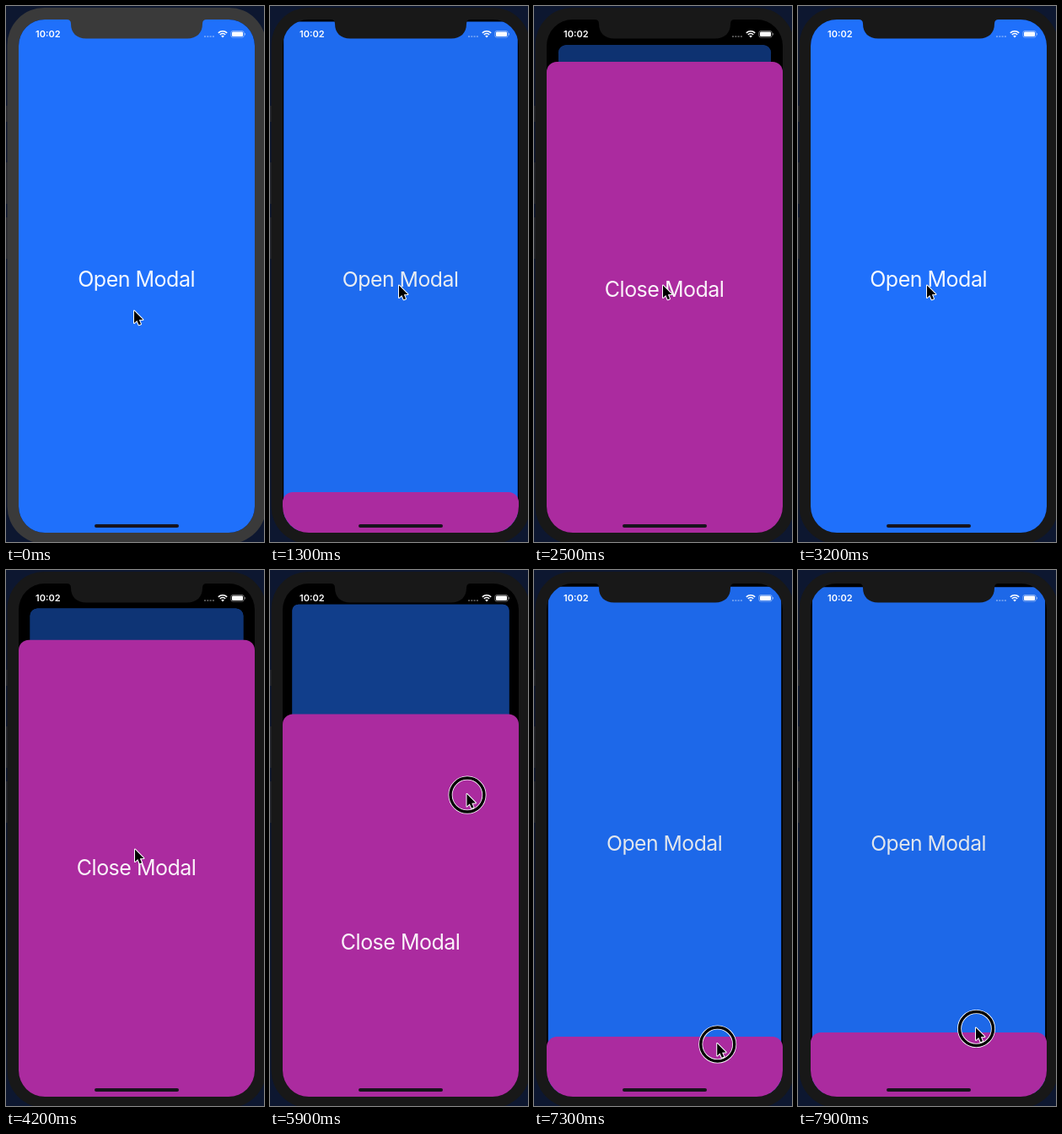
Write an HTML page with a canvas that moves like this. It is 306 by 634 pixels and loops after 8 s.

```html
<!DOCTYPE html>
<html lang="en">
<head>
<meta charset="utf-8">
<title>Modal sheet</title>
<style>
  html, body { margin: 0; width: 100%; height: 100%; overflow: hidden; background: #0d1730; }
  canvas { display: block; width: 306px; height: 634px; }
</style>
</head>
<body>
<canvas id="stage"></canvas>
<script>
const W = 306, H = 634, LOOP = 8000, STEP = 100;
const BLUE = '#1f70fb', PURPLE = '#ab2b9f';
const SCREEN = { x: 15, y: 16, w: 280, h: 607, r: 31 };
const OPEN_Y = 66, CLOSED_Y = 623;

const canvas = document.getElementById('stage');
const ctx = canvas.getContext('2d');
const dpr = window.devicePixelRatio || 1;
canvas.width = W * dpr;
canvas.height = H * dpr;

const lerp = (a, b, k) => a + (b - a) * k;
const clamp = v => Math.max(0, Math.min(1, v));
const smooth = k => k * k * (3 - 2 * k);

// Keys are [time, ...values]
function track(keys, t) {
  if (t <= keys[0][0]) return keys[0].slice(1);
  for (let i = 1; i < keys.length; i++) {
    const a = keys[i - 1], b = keys[i];
    if (t < b[0]) {
      const k = smooth((t - a[0]) / (b[0] - a[0]));
      return a.slice(1).map((v, j) => lerp(v, b[j + 1], k));
    }
  }
  return keys[keys.length - 1].slice(1);
}

const pointerKeys = [
  [0, 152, 360], [200, 197, 350], [450, 131, 324], [600, 153, 330],
  [4750, 153, 330], [5500, 232, 160], [5650, 232, 160],
  [6250, 236, 438], [6800, 238, 326], [7450, 214, 596], [7900, 211, 541]
];
const dragKeys = [
  [5650, OPEN_Y], [6250, 344], [6800, 233], [7450, 602], [7900, 547]
];

// Critically damped spring: the part still to travel, ms in
function rest(ms, omega) {
  const x = omega * Math.max(0, ms) / 1000;
  return (1 + x) * Math.exp(-x);
}

function sheetY(t) {
  if (t < 1270) return CLOSED_Y;
  if (t < 2840) return lerp(OPEN_Y, CLOSED_Y, rest(t - 1270, 16.2));
  if (t < 3200) return lerp(CLOSED_Y, OPEN_Y, rest(t - 2840, 20));
  if (t < 3870) return CLOSED_Y;
  if (t < 5650) return lerp(OPEN_Y, CLOSED_Y, rest(t - 3870, 16.2));
  return track(dragKeys, t)[0];
}

const within = (t, from) => t >= from && t < from + 100;
const isTap = t => [900, 2700, 3600].some(from => within(t, from));

function box(x, y, w, h, r, fill) {
  ctx.beginPath();
  ctx.roundRect(x, y, w, h, r);
  ctx.fillStyle = fill;
  ctx.fill();
}

function label(text, y, alpha) {
  ctx.font = '400 25px Inter, "Liberation Sans", sans-serif';
  ctx.letterSpacing = '-0.5px';
  ctx.textAlign = 'center';
  ctx.fillStyle = `rgba(255,255,255,${alpha})`;
  ctx.fillText(text, 154.6, y);
  ctx.letterSpacing = '0px';
}

function drawPage(p, alpha) {
  const { x, y, w, h } = SCREEN;
  const cx = x + w / 2, cy = y + h / 2, s = 1 - 0.1 * p;
  ctx.save();
  ctx.translate(cx, cy);
  ctx.scale(s, s);
  ctx.translate(-cx, -cy);
  box(x, y, w, h, 10 * p, BLUE);
  label('Open Modal', 332, alpha);
  box(x, y, w, h, 10 * p, `rgba(0,0,0,${0.55 * p})`);
  ctx.restore();
}

function drawSheet(y, alpha) {
  if (y >= CLOSED_Y) return;
  box(SCREEN.x, y, SCREEN.w, H, 12, PURPLE);
  label('Close Modal', y + 278, alpha);
}

function drawNotch(color) {
  ctx.beginPath();
  ctx.moveTo(72, 15);
  ctx.lineTo(72, 16);
  ctx.quadraticCurveTo(77, 16, 77, 21);
  ctx.bezierCurveTo(77, 32, 84, 38.5, 95, 38.5);
  ctx.lineTo(215, 38.5);
  ctx.bezierCurveTo(226, 38.5, 233, 32, 233, 21);
  ctx.quadraticCurveTo(233, 16, 238, 16);
  ctx.lineTo(238, 15);
  ctx.closePath();
  ctx.fillStyle = color;
  ctx.fill();
}

function drawStatus() {
  ctx.fillStyle = '#fff';
  ctx.textAlign = 'left';
  ctx.font = '600 11px Inter, "Liberation Sans", sans-serif';
  ctx.fillText('10:02', 35, 37.2);

  ctx.fillStyle = 'rgba(255,255,255,.4)';
  for (let i = 0; i < 4; i++) ctx.fillRect(235 + i * 3.3, 35.3, 2, 1.6);

  ctx.strokeStyle = '#fff';
  ctx.lineWidth = 1.6;
  for (const r of [4.5, 7.3]) {
    ctx.beginPath();
    ctx.arc(257, 37, r, -Math.PI * 0.75, -Math.PI * 0.25);
    ctx.stroke();
  }
  ctx.beginPath();
  ctx.moveTo(257, 37.4);
  ctx.arc(257, 37.4, 2.6, -Math.PI * 0.75, -Math.PI * 0.25);
  ctx.fillStyle = '#fff';
  ctx.fill();

  ctx.beginPath();
  ctx.roundRect(266.8, 29.5, 15.4, 7.6, 2.2);
  ctx.strokeStyle = 'rgba(255,255,255,.5)';
  ctx.lineWidth = 0.8;
  ctx.stroke();
  box(268, 30.6, 13, 5.4, 1.2, '#fff');
  box(283, 32, 1, 2.6, 0.5, 'rgba(255,255,255,.5)');
}

function drawPointer(x, y, pressed) {
  if (pressed) {
    ctx.beginPath();
    ctx.arc(x + 0.5, y + 1.5, 20, 0, Math.PI * 2);
    ctx.strokeStyle = '#fff';
    ctx.lineWidth = 5;
    ctx.stroke();
    ctx.strokeStyle = '#000';
    ctx.lineWidth = 3.4;
    ctx.stroke();
  }
  ctx.save();
  ctx.translate(x, y);
  ctx.beginPath();
  ctx.moveTo(0, 0.5);
  for (const [px, py] of [[0, 15], [3.3, 12], [5.6, 17.3], [8, 16.3], [5.8, 11.2], [10.4, 11]]) ctx.lineTo(px, py);
  ctx.closePath();
  ctx.lineJoin = 'round';
  ctx.strokeStyle = '#fff';
  ctx.lineWidth = 2;
  ctx.stroke();
  ctx.fillStyle = '#000';
  ctx.fill();
  ctx.restore();
}

function drawBody(color) {
  ctx.fillStyle = '#0d1730';
  ctx.fillRect(0, 0, W, H);
  ctx.fillStyle = '#25272f';
  for (const [y, h] of [[118, 19], [185, 49], [250, 49]]) ctx.fillRect(0, y, 3, h);
  box(1.5, 2, 307, 634, 44, color);
}

function draw(t) {
  const shade = Math.round(lerp(58, 24, clamp((t - 700) / 200)));
  const bezel = `rgb(${shade},${shade},${shade})`;
  const y = sheetY(t);
  const p = clamp((CLOSED_Y - y) / (CLOSED_Y - OPEN_Y));
  const tap = isTap(t);
  const alpha = tap ? 0.5 : 0.95;

  ctx.setTransform(dpr, 0, 0, dpr, 0, 0);
  drawBody(bezel);

  ctx.save();
  ctx.beginPath();
  ctx.roundRect(SCREEN.x, SCREEN.y, SCREEN.w, SCREEN.h, SCREEN.r);
  ctx.clip();
  ctx.fillStyle = '#000';
  ctx.fillRect(0, 0, W, H);
  drawPage(p, alpha);
  drawSheet(y, alpha);
  drawStatus();
  box(105, 613, 100, 4, 2, '#17131c');
  ctx.restore();

  drawNotch(bezel);
  const [px, py] = track(pointerKeys, t);
  drawPointer(px, py, tap || t >= 5600);
}

const start = performance.now();
function frame() {
  const t = (performance.now() - start) % LOOP;
  draw(Math.floor(t / STEP) * STEP);
  requestAnimationFrame(frame);
}
frame();
</script>
</body>
</html>
```
